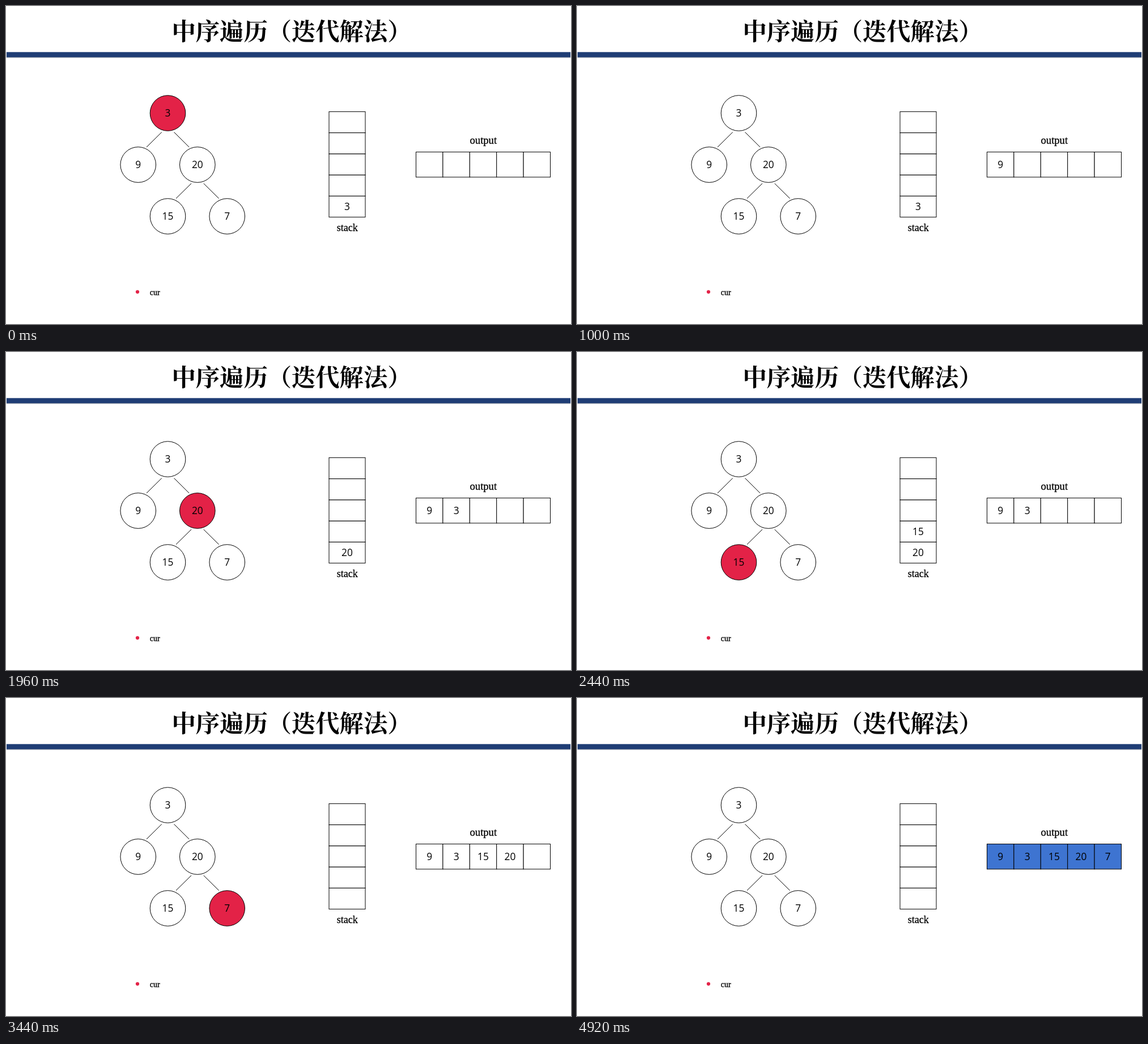
An HTML page for the animation above (5.4 s loop, 997 by 561 pixels).

```html
<!DOCTYPE html>
<html lang="zh">
<head>
<meta charset="utf-8">
<style>
html, body { margin: 0; width: 100%; height: 100%; overflow: hidden; background: #fff; }
svg { display: block; }
text { text-anchor: middle; }
.title { font: 900 42.3px "Noto Serif CJK SC", "Noto Sans CJK SC", "Noto Sans CJK", serif; text-anchor: start; }
.label { font: 18px "Liberation Serif", serif; stroke: #000; stroke-width: .3; }
.num { font: 17.3px "Open Sans", "Noto Sans", sans-serif; }
.shape { fill: #fff; stroke: #000; stroke-width: 1; }
</style>
</head>
<body>
<svg id="stage" width="997" height="561" viewBox="0 0 997 561">
  <text class="title" x="292.5" y="60">中序遍历（迭代解法）</text>
  <rect x="1" y="90" width="995" height="1" fill="#8f96a6"/>
  <rect x="1" y="91" width="995" height="1" fill="#dcdde0"/>
  <rect x="1" y="81.3" width="995" height="9" fill="#1f3d75"/>
  <path class="shape" d="M274.8 222.5L248 249M296.5 222.5L323.2 249M327 313L300 339.5M348.7 313L375.6 339.5" stroke-width="1.1"/>
  <text class="label" x="602.3" y="397">stack</text>
  <text class="label" x="842.3" y="243.3" style="font-size:18.6px">output</text>
  <circle cx="232" cy="504.3" r="3.1" fill="#e32247"/>
  <text class="label" x="262.8" y="510" style="font-size:14px">cur</text>
</svg>
<script>
const RED = "#e32247", BLUE = "#3e74d1";
const stage = document.getElementById("stage");

function add(tag, attrs) {
  const el = document.createElementNS("http://www.w3.org/2000/svg", tag);
  for (const key in attrs) el.setAttribute(key, attrs[key]);
  return stage.appendChild(el);
}

const number = (x, y) => add("text", { class: "num", x, y: y + 6.2 });

const nodes = [[3, 285.5, 189], [9, 233.2, 280], [20, 337.8, 280], [15, 285.5, 371], [7, 390.2, 371]]
  .map(([value, cx, cy]) => {
    const circle = add("circle", { class: "shape", cx, cy, r: 31.3 });
    number(cx, cy).textContent = value;
    return { value, circle };
  });

// Stack cells run from the bottom up, output cells from left to right.
const stackCells = [0, 1, 2, 3, 4].map(i => {
  const y = 335.2 - 37.2 * i;
  add("rect", { class: "shape", x: 570, y, width: 64, height: 37.2 });
  return number(602, y + 18.4);
});
const outputCells = [0, 1, 2, 3, 4].map(i => {
  const x = 723.5 + 47.4 * i;
  const rect = add("rect", { class: "shape", x, y: 257.6, width: 47.4, height: 44.3 });
  return { rect, text: number(x + 23.7, 280) };
});

// Each step: start time, current node, stack, how many values are output.
const order = [9, 3, 15, 20, 7];
const steps = [
  [0, 3, [3], 0],
  [520, 9, [3, 9], 0],
  [1000, null, [3], 1],
  [1480, 20, [], 2],
  [1960, 20, [20], 2],
  [2440, 15, [20, 15], 2],
  [2960, null, [20], 3],
  [3440, 7, [], 4],
  [3920, null, [7], 4],
  [4400, null, [], 5],
  [4920, null, [], 5]
];

let shown;
function draw(now) {
  const step = steps.findLast(s => s[0] <= now % 5400);
  if (step === shown) return;
  shown = step;
  const [start, cur, stack, count] = step;
  for (const { value, circle } of nodes) circle.style.fill = value === cur ? RED : "#fff";
  stackCells.forEach((text, i) => text.textContent = stack[i] ?? "");
  outputCells.forEach(({ rect, text }, i) => {
    text.textContent = i < count ? order[i] : "";
    rect.style.fill = start === 4920 ? BLUE : "#fff";
  });
}

function loop() {
  draw(performance.now());
  requestAnimationFrame(loop);
}
loop();
</script>
</body>
</html>
```
